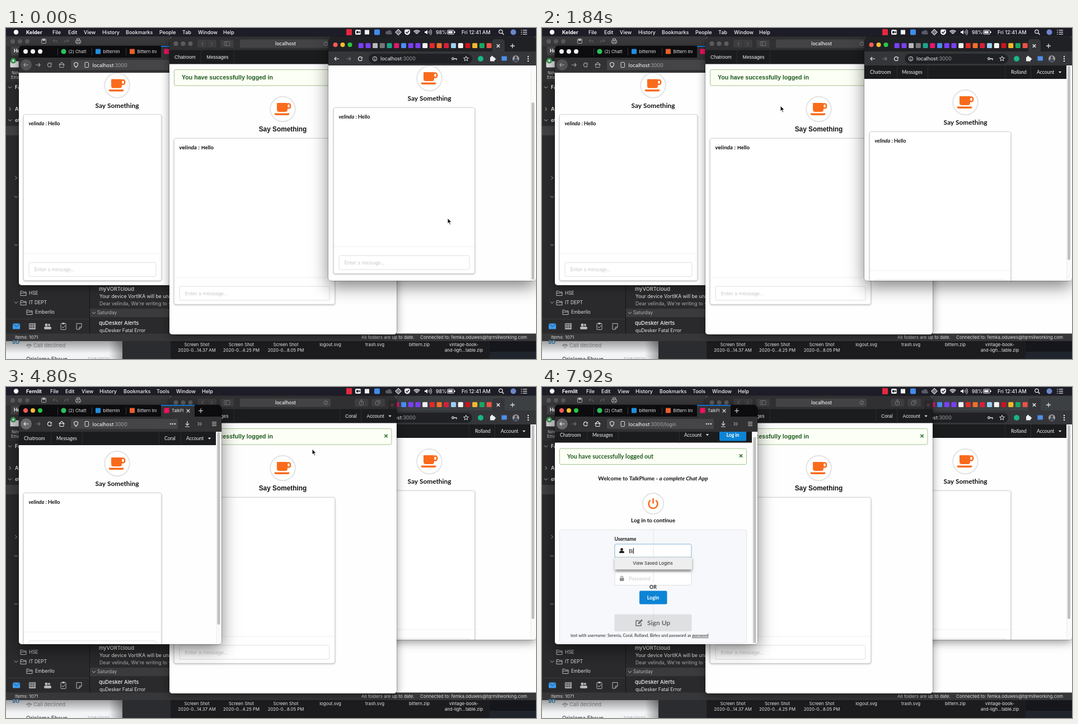
These frames come from a looping animation (947 by 592 pixels, 8 s). An HTML page with a canvas:

```html
<!DOCTYPE html>
<html lang="en">
<head>
<meta charset="utf-8">
<title>Chat windows</title>
<style>
html, body { margin: 0; width: 100%; height: 100%; overflow: hidden; background: #222; }
canvas { display: block; width: 947px; height: 592px; }
</style>
</head>
<body>
<canvas id="stage" width="947" height="592"></canvas>
<script>
const c = document.getElementById('stage').getContext('2d');
const LOOP = 8000;
const UI = 'Inter, sans-serif', LATO = 'Lato, sans-serif', ARIAL = '"Liberation Sans", sans-serif';
const ORANGE = '#f96b1c', BLUE = '#0d84d6', INK = '#1b1c1d', GREY = '#b9b9bb';
const USER = 'velinda', PAT = 'Rolland', FAY = 'Coral';

// Drawing helpers
function rect(x, y, w, h, fill, r = 0, stroke, lw = 1) {
  c.beginPath();
  c.roundRect(x, y, w, h, r);
  if (fill) { c.fillStyle = fill; c.fill(); }
  if (stroke) { c.strokeStyle = stroke; c.lineWidth = lw; c.stroke(); }
}
function disc(x, y, r, fill, stroke, lw = 1) {
  c.beginPath();
  c.arc(x, y, r, 0, 7);
  if (fill) { c.fillStyle = fill; c.fill(); }
  if (stroke) { c.strokeStyle = stroke; c.lineWidth = lw; c.stroke(); }
}
function line(p, color = GREY, lw = 1, fill) {
  c.beginPath();
  for (let i = 0; i < p.length; i += 2) c.lineTo(p[i], p[i + 1]);
  if (fill) { c.closePath(); c.fillStyle = fill; c.fill(); }
  if (color) { c.strokeStyle = color; c.lineWidth = lw; c.stroke(); }
}
function text(s, x, y, size, color, font = UI, style = '', align = 'left') {
  c.font = `${style} ${size}px ${font}`;
  c.textAlign = align;
  c.fillStyle = color;
  c.fillText(s, x, y + size * 0.35);
  return c.measureText(s).width;
}
function clip(x, y, w, h, draw, r = 0) {
  c.save();
  c.beginPath();
  c.roundRect(x, y, w, h, r);
  c.clip();
  draw();
  c.restore();
}
function fade(x0, y0, x1, y1, alpha) {
  const g = c.createLinearGradient(x0, y0, x1, y1);
  g.addColorStop(0, `rgba(0,0,0,${alpha})`);
  g.addColorStop(1, 'rgba(0,0,0,0)');
  return g;
}
function cross(x, y, r, color, lw = 1) {
  line([x - r, y - r, x + r, y + r], color, lw);
  line([x - r, y + r, x + r, y - r], color, lw);
}
function plus(x, y, r, color, lw = 1) {
  line([x - r, y, x + r, y], color, lw);
  line([x, y - r, x, y + r], color, lw);
}
function chevron(x, y, dir, color = GREY) {
  if (dir === 'd') line([x - 3, y - 1.5, x, y + 1.5, x + 3, y - 1.5], color);
  else {
    const s = dir === 'r' ? 1 : -1;
    line([x - 1.5 * s, y - 3, x + 1.5 * s, y, x - 1.5 * s, y + 3], color);
  }
}
function arrow(x, y, dir, color) {
  line([x - 4 * dir, y, x + 4 * dir, y], color, 1.2);
  line([x + dir, y - 3, x + 4 * dir, y, x + dir, y + 3], color, 1.2);
}
function reload(x, y, color, r = 3.5) {
  c.beginPath();
  c.arc(x, y, r, 0.3, 5.4);
  c.strokeStyle = color; c.lineWidth = 1.2; c.stroke();
  line([x + r + 0.5, y - r, x + r + 0.5, y - 0.5, x + 0.5, y - 0.5], null, 0, color);
}
function bars(x, y, w, color) {
  for (const d of [-3, 0, 3]) line([x - w, y + d, x + w, y + d], color, 1.2);
}
function lights(x, y, colors) {
  colors.forEach((k, i) => disc(x + 13 * i, y, 4, k));
}
const LIT = ['#fc5b57', '#fdbc2e', '#28c840'];
const same = k => [k, k, k];
function frame(x, y, w, h, active) {
  c.save();
  c.shadowColor = active ? 'rgba(0,0,0,.5)' : 'rgba(0,0,0,.4)';
  c.shadowBlur = active ? 30 : 16;
  c.shadowOffsetY = active ? 10 : 5;
  rect(x, y, w, h, '#fefefe', 5);
  c.restore();
  rect(x, y, w, h, null, 5, 'rgba(0,0,0,.45)');
}

// Timing helpers
const clamp = u => Math.max(0, Math.min(1, u));
const smooth = u => u * u * (3 - 2 * u);
const ramp = (t, a, b) => smooth(clamp((t - a) / (b - a)));

// Shared page parts
function nav(x, right, y, h, items, seps, font) {
  rect(x, y, right - x, h, INK);
  for (const s of seps) line([s, y, s, y + h], '#2b2c2d');
  for (const [s, tx] of items) {
    text(s, tx, y + h / 2, 8.6, '#f2f2f2', font);
    if (s === 'Account') {
      const q = tx + 41.5, m = y + h / 2;
      line([q - 2.7, m - 1.2, q + 2.7, m - 1.2, q, m + 1.8], null, 0, '#eee');
    }
  }
}
function notice(x, y, w, s, font) {
  rect(x + .5, y + .5, w - 1, 28.5, '#fcfff5', 2.5, '#a3c293');
  text(s, x + 14, y + 14.5, 10.6, '#1f5a20', font, 'bold');
  cross(x + w - 10.5, y + 13.5, 2.6, '#3f7d40', 1.8);
}
function badge(x, y, r) {
  disc(x, y, r, '#fff', '#e3e3e3', 2);
}
function cup(x, y) {
  badge(x, y, 22.3);
  rect(x - 10.5, y - 11, 19, 16, ORANGE, [1, 1, 4, 4]);
  rect(x + 7.5, y - 9.5, 6, 8, null, 4, ORANGE, 2.6);
  rect(x - 15, y + 7.5, 27, 3.4, ORANGE, [0.5, 0.5, 3, 3]);
}
function field(x, y, w, h, hint, font, hx = 10) {
  rect(x + .5, y + .5, w - 1, h - 1, '#fff', 2.5, '#dededf');
  text(hint, x + hx, y + h / 2, 9.2, '#c8c8c8', font);
}
function chat(cx, x, w, y, font) {
  cup(cx, y);
  text('Say Something', cx, y + 36, 11.85, '#111', font, 'bold', 'center');
  const top = y + 52.5;
  c.save();
  c.shadowColor = 'rgba(34,36,38,.28)';
  c.shadowBlur = 3; c.shadowOffsetY = 1;
  rect(x + .5, top, w - 1, 296.5, '#fff', 3, '#d6d7d8');
  c.restore();
  rect(x + 1, top + .5, w - 2, 295.5, '#fff', 3);
  const n = text(USER, x + 9.5, y + 68.7, 9.1, '#111', font, 'italic bold');
  text(' : Hello', x + 9.5 + n, y + 68.7, 9.1, '#111', font, 'bold');
  line([x + 1, top + 248.5, x + w - 1, top + 248.5], '#eeeeee');
  field(x + 9.5, top + 264, w - 19, 26, 'Enter a message...', font);
}
function scrollbar(x, top, h, y0, y1) {
  rect(x, top, 9, h, '#fafafa');
  line([x + .5, top, x + .5, top + h], '#ececec');
  rect(x + 2, y0, 5, y1 - y0, '#c0c0c2', 2.5);
}

// Desktop behind the three browser windows
function desktop() {
  rect(0, 0, 947, 592, '#2a2a2c');
  rect(0, 15, 947, 17, '#39393b');
  lights(12, 24, same('#59595b'));
  rect(63.5, 19.5, 8, 8, null, 1, GREY); rect(65, 20, 5, 3, GREY);
  for (const [x, s] of [[88, -1], [108, 1]]) {
    line([x + s, 20, x + 4 * s, 23, x + s, 26], '#666');
    line([x + 4 * s, 23, x - 3 * s, 23, x - 4 * s, 27], '#666');
  }
  rect(124.5, 22, 9, 5, null, 1, GREY); rect(126.5, 19, 5, 3, null, 0, GREY); rect(126.5, 25, 5, 3, '#39393b', 0, GREY);
  rect(0, 32, 24, 64, '#303032');
  rect(9, 33, 15, 16, '#444446');
  text('Home', 14, 41, 8.5, '#fff', UI, 'bold');
  rect(7.5, 59.5, 17, 11, '#d8d8da', 1);
  disc(13, 58.5, 5, '#31964a'); plus(13, 58.5, 2.8, '#fff', 1.2);
  text('New', 10, 80, 7.5, '#ccc'); text('Email', 9, 88.5, 7.5, '#ccc');
  rect(0, 175, 148, 17, '#404042');
  [[7, 106, 'd', 'Favourites'], [7, 145, 'r', 'All'], [7, 165, 'd', 'office']].forEach(([x, y, d, s]) => {
    chevron(x, y, d); text(s, 16, y, 8.6, '#eee', UI, 'bold');
  });
  for (const [y, d] of [[268, 'r'], [302, 'd'], [388, 'd'], [491, 'd']]) chevron(18, y, d);
  rect(149, 455, 1, 92, '#161617');
  for (const [x, y, s] of [[26, 474.5, 'HSE'], [26, 491.5, 'IT DEPT'], [37, 508.5, 'Emberilo']]) {
    line([x, y - 4, x + 4, y - 4, x + 5, y - 2.5, x + 10, y - 2.5, x + 10, y + 4, x, y + 4, x, y - 4], GREY);
    line([x, y - .5, x + 10, y - .5], GREY);
    text(s, x + 15, y, 8.4, '#e4e4e4');
  }
  line([0, 520.5, 149, 520.5], '#3c3c3e');
  rect(12, 528.5, 13, 10, '#3f9cf0', 1); line([12, 529, 18.5, 534.5, 25, 529], '#173c62');
  rect(41.5, 528.5, 11, 10, null, 0, GREY);
  for (const d of [0, 3, 6]) { line([42, 531.5 + d, 52, 531.5 + d]); line([44.5 + d, 529, 44.5 + d, 538]); }
  for (const [x, r] of [[72, 2.5], [77, 2]]) { disc(x, 531, r, GREY); rect(x - 4, 534, 8, 5, GREY, 3); }
  rect(98, 528.5, 9, 11, null, 1, GREY); rect(100.5, 527, 4, 3, GREY); line([100, 534, 102, 536.5, 105.5, 532]);
  line([126, 528.5, 135, 528.5, 135, 535, 131, 539, 126, 539, 126, 528.5]); line([131, 539, 131, 535, 135, 535]);
  text('myVORTcloud', 166, 467, 9.3, '#f0f0f0', UI, '500');
  text('Your device VortIKA will be unavailable', 167, 480, 8.7, '#e4e4e4');
  text(`Dear ${USER}, We're writing to you`, 167, 492.5, 8.7, '#aaa');
  rect(150, 502, 146, 15, '#3b3b3d');
  chevron(157, 509.5, 'd'); text('Saturday', 163, 509.5, 8.4, '#b4b4b4');
  text('quDesker Alerts', 166, 528, 9.3, '#f0f0f0', UI, '500');
  text('quDesker Fatal Error', 167, 541, 8.5, '#e4e4e4');
  rect(698, 440, 249, 107, '#fefefe');
  rect(0, 546.5, 947, 13.5, '#373739');
  text('Items: 1071', 16, 553.5, 8, '#ddd');
  text('All folders are up to date.', 635, 553.5, 8, '#ddd');
  text('Connected to: femka.oduwes@tqrmillworking.com', 931, 553.5, 8, '#ddd', UI, '', 'right');
  // Strip under the mail window
  rect(0, 560, 208, 32, '#f3f4f6');
  text('SO', 11, 562, 9, '#3386c0', UI, 'bold');
  c.beginPath(); c.arc(41, 571, 5, 3.6, 5.8); c.strokeStyle = '#a4a6aa'; c.lineWidth = 2; c.stroke();
  disc(41, 570, 2, null, '#a4a6aa');
  text('Call declined', 49, 568, 9.4, '#8e9094');
  text('Oriolema Ebsun', 36, 593, 9.8, '#3f4044', UI, '500');
  text('7/28/2020', 145, 592, 8, '#a0a2a6');
  rect(0, 560, 208, 22, fade(0, 560, 0, 582, .35));
  rect(184, 560, 24, 32, fade(208, 560, 184, 560, .35));
  rect(208, 560, 739, 32, '#1c1c1f');
  rect(208, 560, 86, 32, '#2a2c30');
  rect(864, 560, 83, 32, '#15171d'); rect(864, 579, 83, 13, '#20242c');
  const files = [[341, 'Screen Shot', '2020-0...14.37 AM'], [420.5, 'Screen Shot', '2020-0...4.25 PM'],
    [500, 'Screen Shot', '2020-0...8.05 PM'], [579.5, 'logout.svg', ''], [659, 'trash.svg', ''],
    [738.5, 'bittern.zip', ''], [818, 'vintage-book-', 'and-ligh...table.zip']];
  for (const [x, a, b] of files) {
    text(a, x, 566.5, 7.8, '#e6e6e6', UI, '', 'center');
    text(b, x, 576.5, 7.8, '#e6e6e6', UI, '', 'center');
  }
}

const MENUS = {
  Kelder: 'File 83 Edit 111 View 139 History 172 Bookmarks 214 People 274 Tab 315 Window 343 Help 388',
  Lagoon: 'File 75 Edit 102 View 131 History 163 Bookmarks 206 Window 265 Help 311',
  Fernlit: 'File 79 Edit 106 View 135 History 167 Bookmarks 210 Tools 269 Window 304 Help 350'
};
function menubar(app) {
  rect(0, 0, 947, 15, '#1d1d27');
  disc(18, 7.5, 4.2, '#fff');
  text(app, 36, 7.5, 9, '#fff', UI, 'bold');
  const m = MENUS[app].split(' ');
  for (let i = 0; i < m.length; i += 2) text(m[i], +m[i + 1], 7.5, 9, '#f4f4f4', UI, '500');
  const W = '#f0f0f0';
  rect(608, 2, 10, 11, '#e5283e', 1);
  rect(624, 3, 10, 9, W, 2); rect(626, 5.5, 4, 4, '#1d1d27', 1); line([630, 7.5, 633, 5.5, 633, 9.5], null, 0, '#1d1d27');
  rect(641, 3.5, 8, 8, W);
  rect(658, 2.5, 10, 10, '#3f8dea', 2);
  disc(681, 8.5, 3, '#5a5a64'); disc(685, 7.5, 3.7, '#5a5a64'); rect(680, 8, 10, 3.5, '#5a5a64', 2);
  line([701, 2.5, 706, 7.5, 701, 12.5, 696, 7.5, 701, 2.5], W, 1.2); disc(701, 7.5, 1.8, null, W);
  rect(712, 2.5, 10, 10, W, [3, 3, 5, 5]); line([714.5, 7, 716.5, 9.5, 720, 5], '#1d1d27', 1.3);
  for (const r of [2.6, 5.2, 7.8]) {
    c.beginPath(); c.arc(734, 12, r, -2.35, -0.8); c.strokeStyle = W; c.lineWidth = 1.5; c.stroke();
  }
  line([748, 6, 750, 6, 753, 3.5, 753, 11.5, 750, 9, 748, 9], null, 0, W);
  for (const r of [2.5, 5, 7.5]) {
    c.beginPath(); c.arc(753, 7.5, r, -0.8, 0.8); c.strokeStyle = W; c.lineWidth = 1; c.stroke();
  }
  text('98%', 768, 7.5, 8.6, W, UI, '500');
  rect(788.5, 4, 12, 7, null, 1.5, W); rect(790, 5.5, 8, 4, W); rect(801, 6, 1.5, 3, W);
  text('Fri 12:41 AM', 814, 7.5, 9, W, UI, '500');
  disc(884, 6.5, 3.2, null, W, 1.2); line([886.5, 9, 889.5, 12], W, 1.4);
  disc(906.5, 7.5, 5, '#6d86c9');
  for (const y of [4, 7.5, 11]) { line([920, y, 922, y], W, 1.2); line([923.5, y, 931, y], W, 1.2); }
}

// Left browser
function leftWindow(t) {
  const active = t >= 2960, login = t >= 5680;
  frame(23, 32, 362, 428, active);
  clip(23, 32, 362, 428, () => {
    rect(23, 32, 362, 21, '#0c0c0f');
    lights(35, 42, active ? LIT : same('#f3f3f3'));
    rect(277, 32, 60, 21, '#323234'); rect(277, 32, 60, 1.5, '#0a84ff');
    const tabs = [[98, '#2cc05c', '(2) Chatt'], [160, '#1f8fe0', 'bitternin'], [221, '#e8602c', 'Bittern Inn'], [282.5, '#f0125c', 'TalkPl']];
    tabs.forEach(([x, k, s], i) => {
      if (i) rect(x, 37.5, 9, 9, k, 1); else disc(x + 5, 42, 4.6, k);
      clip(x, 33, i === 3 ? 35 : 48, 20, () => text(s, x + 13.5, 42.5, 7.7, '#e8e8e8'));
    });
    for (const x of [92.5, 153.5, 214.5]) line([x, 36, x, 49], '#38383b');
    cross(325.5, 42.5, 2.8, '#eee', 1.2); plus(348, 42.5, 4, '#ddd', 1.2);
    rect(23, 53, 362, 27, '#323234');
    const k = active ? '#e9e9ea' : '#a5a5a7';
    disc(36, 66, 10, active ? '#69696c' : '#515154'); arrow(36, 66, -1, k);
    arrow(57, 66, 1, active ? '#77777a' : '#a5a5a7');
    reload(78, 66, k);
    line([94.5, 66, 99.5, 61.5, 104.5, 66], k, 1.2); rect(96, 65.5, 7, 5, null, 0, k);
    rect(116, 57, 191, 18, '#454548', 2);
    line([125, 61.5, 128.5, 63, 128, 67, 125, 70.5, 122, 67, 121.5, 63, 125, 61.5], '#ddd', 1.2);
    rect(141, 61.5, 6.5, 9, null, 1, '#ddd');
    const w = text('localhost', 154.5, 66.5, 8.8, '#fff');
    text(':3000' + (login ? '/login' : ''), 154.5 + w, 66.5, 8.8, '#a6a6a8');
    for (const d of [-4, 0, 4]) disc(298 + d, 66, 1.3, '#ddd');
    line([324, 61, 324, 68], '#ddd', 1.2); line([321, 65.5, 324, 68.5, 327, 65.5], '#ddd', 1.2); line([320, 71, 328, 71], '#ddd', 1.2);
    chevron(344, 66, 'r', '#ddd'); chevron(348, 66, 'r', '#ddd');
    bars(372, 66, 4, '#ddd');
    clip(23, 80, 362, 380, () => login ? loginPage(t) : leftChat(t));
  }, 5);
}
function leftChat(t) {
  const s = 34.5 * (1 - ramp(t, 3440, 3720));
  rect(23, 80, 362, 380, '#fefefe');
  chat(198.5, 31, 247, 137 - s, LATO);
  nav(23, 375, 80 - s, 24, [['Chatroom', 32], ['Messages', 90], [FAY, 283], ['Account', 322]], [80.5, 136.5, 273.5, 312.5], LATO);
  if (t >= 5080) {
    rect(313.5, 104.5, 61, 24, '#fff', [0, 0, 3, 3], '#d4d4d5');
    text('Log out', 323, 116.5, 8.6, '#222', LATO);
  }
  scrollbar(375.5, 80, 380, 80.5 + s, 425 + s);
}
function person(x, y, k) { disc(x, y - 2, 2.4, k); rect(x - 4.5, y + .5, 9, 4, k, [3, 3, 1, 1]); }
function loginPage(t) {
  const s = 8.5 * ramp(t, 6600, 6680), focus = t >= 7240;
  rect(23, 80, 362, 380, '#fefefe');
  c.save();
  c.translate(0, -s);
  nav(23, 375, 80, 28, [['Chatroom', 32], ['Messages', 90], ['Account', 254]], [80.5, 136.5, 245.5], LATO);
  rect(317, 83, 48, 22, BLUE, 2);
  text('Log in', 341, 94, 8.6, '#fff', LATO, 'bold', 'center');
  notice(31, 118, 335, 'You have successfully logged out', LATO);
  const a = 'Welcome to TalkPlume - ', b = 'a complete Chat App';
  c.font = `bold 9.9px ${LATO}`; const wa = c.measureText(a).width;
  c.font = `italic bold 9.9px ${LATO}`; const x = 198.5 - (wa + c.measureText(b).width) / 2;
  text(a, x, 172.5, 9.9, '#111', LATO, 'bold');
  text(b, x + wa, 172.5, 9.9, '#111', LATO, 'italic bold');
  badge(198.5, 217, 18.6);
  c.beginPath(); c.arc(198.5, 217.5, 8, -0.9, Math.PI + 0.9);
  c.strokeStyle = ORANGE; c.lineWidth = 2.6; c.stroke();
  line([198.5, 207.5, 198.5, 217], ORANGE, 2.6);
  text('Log in to continue', 198.5, 247.5, 9.9, '#111', LATO, 'bold', 'center');
  rect(31.5, 263.5, 334, 203, '#f7f8fb', 3, '#e3e4e7');
  text('Username', 129.5, 280, 8.6, '#111', LATO, 'bold');
  text('Password', 129.5, 330, 8.6, '#111', LATO, 'bold');
  field(129.5, 289, 138, 25, focus ? '' : 'Username', LATO, 25.5);
  if (focus) rect(130, 289.5, 137, 24, '#fff', 2.5, '#85b7d9');
  person(142.5, 301, focus ? '#222' : '#8d8d8f');
  field(129.5, 338.5, 138, 25, 'Password', LATO, 25.5);
  rect(139, 350, 7.5, 5.5, '#8d8d8f', 1); rect(140.7, 346.8, 4, 5, null, 2, '#8d8d8f', 1.2);
  line([199, 264, 199, 358], '#e2e3e6'); line([199, 397, 199, 466], '#e2e3e6');
  text('OR', 198.5, 366.5, 8.8, '#222', LATO, 'bold', 'center');
  rect(174, 373, 49.5, 24, BLUE, 2.5);
  text('Login', 198.5, 385, 9, '#fff', LATO, 'bold', 'center');
  rect(129.5, 415, 138, 30.5, '#dfe0e2', 2.5);
  line([199, 415, 199, 445], '#d5d6d8');
  text('Sign Up', 188, 430.5, 12, '#666769', LATO, 'bold');
  line([174, 426.5, 168, 426.5, 168, 435.5, 177, 435.5, 177, 431], '#666769', 1.5);
  line([172, 432, 179, 425], '#666769', 2.6);
  const w = text(`test with username: Serenia, ${FAY}, ${PAT}, Birley and password as `, 51, 453, 7.4, '#222', LATO);
  const w2 = text('password', 51 + w, 453, 7.4, '#222', LATO, 'italic');
  line([51 + w, 457, 51 + w + w2, 457], '#222', .7);
  if (focus) {
    const typed = t >= 7880 ? 'Bi' : t >= 7720 ? 'B' : '';
    const tw = text(typed, 155, 302, 9.2, '#111', LATO);
    if (typed || (t - 7240) % 1000 < 500) line([155.5 + tw, 296, 155.5 + tw, 307], '#111', .9);
    if (t >= 7320) savedLogins(typed ? [] : ['Serenia', FAY, PAT]);
  }
  c.restore();
  scrollbar(375.5, 80, 380, 81 + s, 449.5 + s);
}
function savedLogins(names) {
  const h = 21.5 + names.length * 18;
  c.save();
  c.shadowColor = 'rgba(0,0,0,.55)'; c.shadowBlur = 5; c.shadowOffsetY = 2;
  rect(129.5, 313.5, 138.5, h, '#eeeeef');
  c.restore();
  names.forEach((n, i) => text(n, 150, 322.5 + 18 * i, 8, '#222'));
  if (names.length) line([130, 313 + h - 21, 268, 313 + h - 21], '#d4d4d5');
  text('View Saved Logins', 198, 324 + names.length * 18, 8, '#222', UI, '', 'center');
}

// Middle browser
function midWindow(t, front) {
  frame(292, 16, 406, 532, front);
  clip(292, 16, 406, 532, () => {
    rect(292, 16, 406, 532, '#fefefe');
    rect(292, 16, 406, 24, front ? '#3b3b3d' : '#303032');
    const k = front ? '#bbb' : '#777';
    lights(303.5, 28, front ? LIT : same('#5c5c5e'));
    rect(342, 21, 34, 14, '#3d3d3f', 2.5); line([359, 21, 359, 35], '#303032');
    chevron(351, 28, 'l', k); chevron(367.5, 28, 'r', '#666');
    rect(383, 21, 24, 14, '#3d3d3f', 2.5); rect(390, 24.5, 10, 7, null, 1, k); line([393.5, 25, 393.5, 31], k);
    rect(418, 20.5, 162, 15, '#434345', 3);
    text('localhost', 499.5, 28.5, 8.5, '#eee', UI, '500', 'center');
    reload(571.5, 28, k, 3);
    rect(623, 21, 24, 14, '#3d3d3f', 2.5); rect(631.5, 26, 7, 6, null, 1, k); line([635, 29, 635, 22.5], k); line([633, 24.5, 635, 22.5, 637, 24.5], k);
    rect(653, 21, 24, 14, '#3d3d3f', 2.5); rect(660, 26, 6, 6, null, 1, k); line([662, 24, 668, 24, 668, 30], k);
    rect(683, 24, 15, 16, '#29292b'); plus(690, 32, 3, '#8a3b46');
    nav(292, 698, 39.5, 25, [['Chatroom', 301], ['Messages', 358.5], [FAY, 606], ['Account', 644.5]], [348.5, 407.5, 596.5, 634.5], ARIAL);
    notice(300, 74, 389.5, 'You have successfully logged in', ARIAL);
    chat(494.5, 300, 288, 145, ARIAL);
  }, 5);
}

// Right browser
const ICONS = ['#7a3ff2', '#7a3ff2', '#b8b8ba', '#77777a', '#1ea489', '#e2186c', '#4b8df8', '#7a3ff2', '#7a3ff2',
  '#f0f0f0', '#e02a2a', '#f0702a', '#d61f3c', '#9bd0f0', '#f4f4f4', '#c8141e', '#f0b92c', '#1da462', '#eb5146'];
function rightWindow(t, front) {
  frame(576, 16, 370.5, 436, front);
  clip(576, 16, 371, 436, () => {
    rect(576, 16, 371, 27, front ? '#202124' : '#3c4043');
    lights(588.5, 30, front ? LIT : same('#55565a'));
    ICONS.forEach((k, i) => rect(629.7 + 12.72 * i, 27, 9, 9, k, 1.5));
    rect(869, 20, 22, 23, '#35363a', [5, 5, 0, 0]);
    cross(879.5, 32, 2.7, '#f1f1f1', 1.3); plus(905, 32, 4, '#ddd', 1.3);
    rect(576, 42, 371, 25, '#35363a');
    arrow(591, 55, -1, '#eee'); arrow(612, 55, 1, '#77787b'); reload(633, 55, '#eee');
    rect(648, 46, 185, 18, '#202124', 9);
    disc(659, 55, 3.8, null, '#ddd'); line([659, 54.5, 659, 57.5], '#ddd', 1.2); disc(659, 53, .6, '#ddd');
    const w = text('localhost', 669, 55, 8.9, '#f2f2f2');
    text(':3000', 669 + w, 55, 8.9, '#a0a1a4');
    disc(798.5, 55, 1.8, null, '#ddd', 1.3); line([800, 55, 805, 55, 805, 57.5], '#ddd', 1.3);
    const star = [];
    for (let i = 0; i <= 10; i++) {
      const r = i % 2 ? 2 : 4.7, q = i * Math.PI / 5 - Math.PI / 2;
      star.push(822 + r * Math.cos(q), 55 + r * Math.sin(q));
    }
    line(star, '#ddd');
    disc(848, 55, 5, '#16b883');
    rect(865, 52, 8, 7.5, '#eee', 1); disc(868.5, 51.5, 1.8, '#eee'); disc(873.5, 55.5, 1.6, '#eee');
    rect(885.5, 50.5, 9.5, 8, '#4d8ee8', 1);
    disc(911, 55, 6, '#9ca0a8'); disc(911, 53, 2.4, '#564239'); rect(907, 55.5, 8, 4.5, '#3c4658', [4, 4, 2, 2]);
    for (const d of [-4, 0, 4]) disc(933, 55 + d, 1.2, '#eee');
    clip(576, 67, 371, 385, () => rightPage(t));
  }, 5);
}
function rightPage(t) {
  const open = t < 1240, s = 82 * (1 - ramp(t, 40, 400));
  rect(576, 67, 371, 385, '#fefefe');
  nav(576, 937, 67 - s, 24, [['Chatroom', 586], ['Messages', 643], [PAT, 838], ['Account', 884]], [634.5, 689.5, 827.5, 873.5], LATO);
  if (open) {
    c.globalAlpha = 1 - ramp(t, 920, 1220);
    notice(585, 100.5 - s, 343, 'You have successfully logged in', LATO);
    c.globalAlpha = 1;
  }
  chat(756.5, 585, 253, (open ? 172 : 133) - s, LATO);
  const y0 = 68 + s * 65 / 82;
  scrollbar(937, 67, 385, y0, y0 + (open ? 317 : 347));
}

// Pointer
const PATH = [[0, 789, 340], [380, 789, 340], [740, 916, 114], [1240, 916, 114], [1840, 426, 139], [2160, 426, 139],
  [2600, 190, 266], [3680, 190, 266], [4240, 591, 82], [4400, 604, 50], [4560, 604, 50], [4800, 547, 111],
  [5060, 344, 92], [5240, 344, 92], [5440, 338, 115], [5800, 338, 115], [6520, 160, 352], [6860, 160, 352],
  [7180, 165, 290], [8000, 165, 290]];
function pointer(t) {
  if (t >= 7720) return;
  let i = 0;
  while (t >= PATH[i + 1][0]) i++;
  const [t0, x0, y0] = PATH[i], [t1, x1, y1] = PATH[i + 1];
  const u = ramp(t, t0, t1), x = x0 + (x1 - x0) * u, y = y0 + (y1 - y0) * u;
  const hand = (t > 700 && t < 1300) || (t > 5020 && t < 5680);
  const beam = t > 6440 && y > 280;
  c.save();
  c.translate(x, y);
  if (beam) {
    for (const [k, w] of [['#fff', 2.4], ['#111', 1.1]]) {
      line([-2.5, 0, 0, 1, 2.5, 0], k, w); line([0, 1, 0, 10], k, w); line([-2.5, 11, 0, 10, 2.5, 11], k, w);
    }
  } else if (hand) {
    c.lineJoin = 'round';
    line([-1, 0, 1, 0, 1.3, 4, 5, 5, 5.3, 8, 4, 11.5, -1, 11.5, -4.3, 7.3, -3.3, 6, -1.2, 7.2, -1, 0], '#111', 1.1, '#fff');
    line([1.2, 8, 1.2, 10], '#111', .7); line([3, 8, 3, 10], '#111', .7);
  } else {
    line([0, 0, 0, 10, 2.3, 8, 4, 12, 5.7, 11.2, 4, 7.4, 7, 7.2, 0, 0], '#fff', 1, '#111');
  }
  c.restore();
}

function draw(t) {
  const stage = t < 2020 ? 0 : t < 2660 ? 1 : 2;
  const order = [[leftWindow, midWindow, rightWindow], [leftWindow, rightWindow, midWindow], [rightWindow, midWindow, leftWindow]][stage];
  desktop();
  order.forEach((w, i) => w(t, i === 2));
  menubar(['Kelder', 'Lagoon', 'Fernlit'][stage]);
  pointer(t);
}
function tick() {
  draw(performance.now() % LOOP);
  requestAnimationFrame(tick);
}
tick();
</script>
</body>
</html>
```
